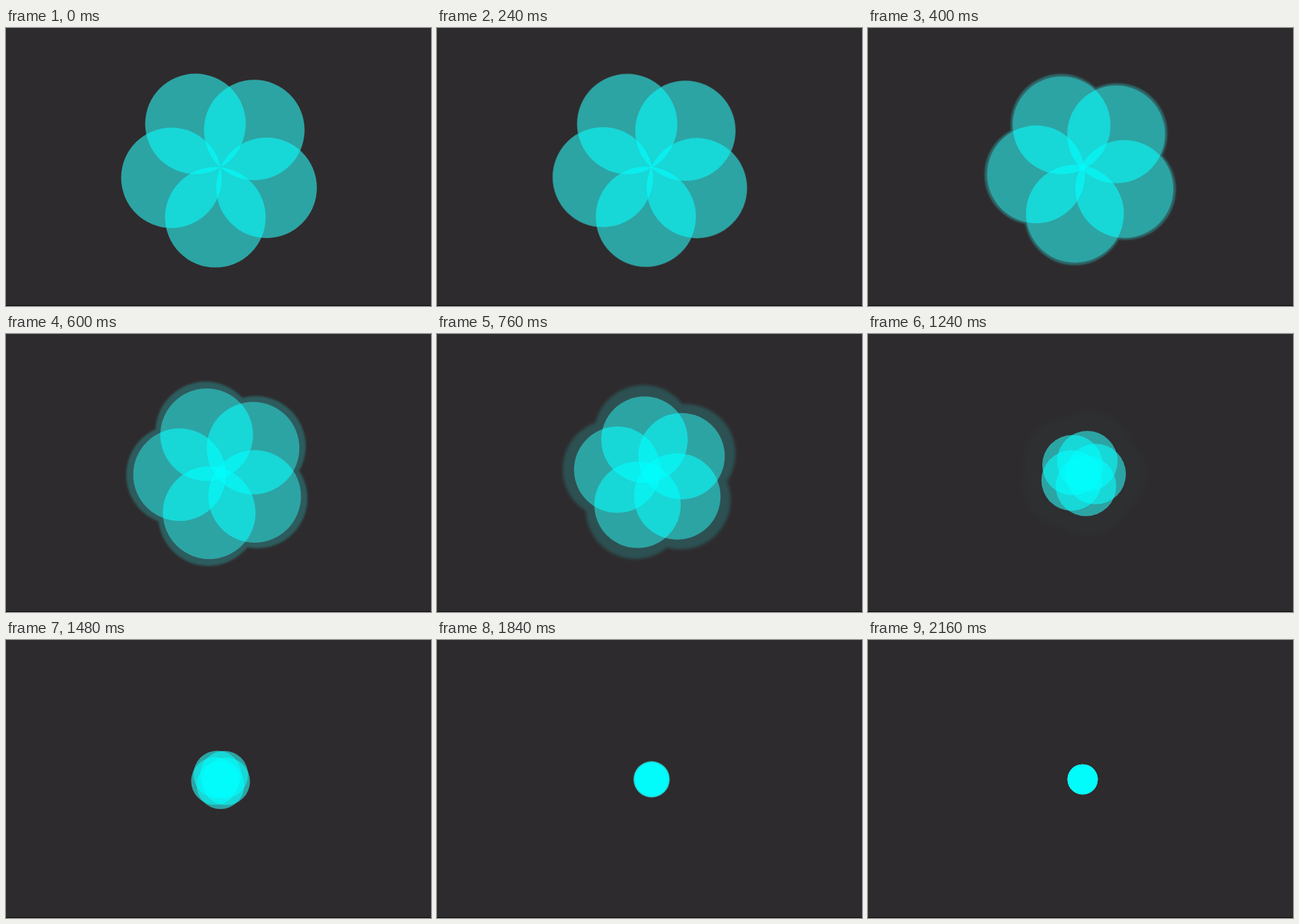
An HTML page for the animation above (2.2 s loop, 600 by 393 pixels).

```html
<!DOCTYPE html>
<html lang="en">
<head>
<meta charset="utf-8">
<title>Breathing flower</title>
<style>
  html, body { margin: 0; width: 100%; height: 100%; overflow: hidden; background: #2d2b2d; }
  svg { display: block; width: 100vw; height: 100vh; }
</style>
</head>
<body>
<svg viewBox="0 0 600 393">
  <defs>
    <!-- Thin layers of cyan look a little greyer than stacked ones -->
    <filter id="tint" filterUnits="userSpaceOnUse" x="0" y="0" width="600" height="393" color-interpolation-filters="sRGB">
      <feColorMatrix values="0 0 0 -.4 .4  0 1 0 0 0  0 0 1 0 0  0 0 0 1 0"/>
    </filter>
    <filter id="soften" filterUnits="userSpaceOnUse" x="0" y="0" width="600" height="393" color-interpolation-filters="sRGB">
      <feGaussianBlur id="blur" stdDeviation="0"/>
    </filter>
  </defs>
  <rect width="600" height="393" fill="#2d2b2d"/>
  <g id="halo" fill="#2dffff" filter="url(#soften)"></g>
  <g id="backing" fill="#2d2b2d"></g>
  <g id="flower" fill="#0ff" fill-opacity=".567" filter="url(#tint)"></g>
  <rect y="392" width="600" height="1" fill="#0c0b0c"/>
</svg>
<script>
const LOOP = 2200, STEP = 40, START = 112, DURATION = LOOP - START;
const CENTER = { x: 303, y: 197 }, RADIUS = 71, PETALS = 5, FIRST_ANGLE = 24;

const byId = id => document.getElementById(id);
const halo = byId('halo'), backing = byId('backing'), flower = byId('flower'), blur = byId('blur');

for (const group of [halo, backing, flower]) {
  for (let i = 0; i < PETALS; i++) {
    group.append(document.createElementNS('http://www.w3.org/2000/svg', 'circle'));
  }
}

// cubic-bezier(.42, 0, .58, 1), solved by bisection
function easeInOut(x) {
  let low = 0, high = 1;
  for (let i = 0; i < 24; i++) {
    const s = (low + high) / 2;
    if (1.26 * s - 0.78 * s * s + 0.52 * s ** 3 < x) low = s;
    else high = s;
  }
  return low * low * (3 - 2 * low);
}

function placePetals(group, scale, progress) {
  const distance = RADIUS * scale * (1 - progress);
  [...group.children].forEach((petal, i) => {
    const angle = (FIRST_ANGLE + 90 * progress + i * 360 / PETALS) * Math.PI / 180;
    petal.setAttribute('cx', CENTER.x + distance * Math.cos(angle));
    petal.setAttribute('cy', CENTER.y + distance * Math.sin(angle));
    petal.setAttribute('r', RADIUS * scale);
  });
}

function draw(time) {
  const x = Math.max(0, (time - START) / DURATION);
  const progress = easeInOut(x);
  const scale = 1 - 0.7 * progress;
  const haloOpacity = Math.max(0, 0.4 * (1 - x / 0.56));

  placePetals(flower, scale, progress);
  placePetals(backing, scale, progress);
  placePetals(halo, 1 - 0.35 * progress ** 2, progress);

  halo.setAttribute('opacity', haloOpacity);
  halo.style.display = x > 0 && haloOpacity > 0 ? '' : 'none';
  blur.setAttribute('stdDeviation', 7 * x);
}

let begin;
function tick(now) {
  begin ??= now;
  const time = (now - begin) % LOOP;
  draw(Math.floor(time / STEP) * STEP);
  requestAnimationFrame(tick);
}
draw(0);
requestAnimationFrame(tick);
</script>
</body>
</html>
```
